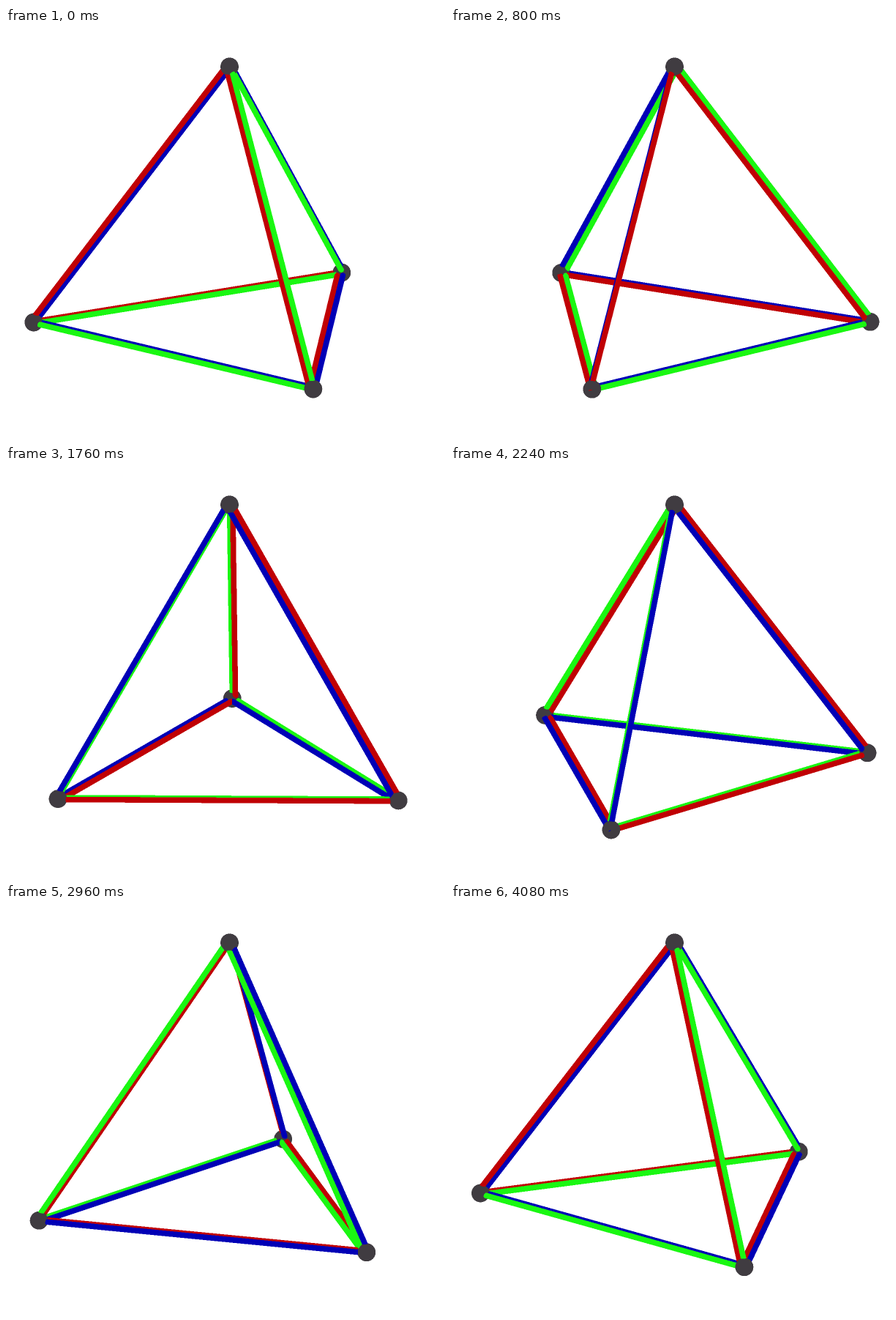
These frames come from a looping animation (600x560 px, 4.16 s). An HTML page with a canvas:

```html
<!DOCTYPE html>
<html lang="en">
<head>
<meta charset="utf-8">
<title>Rotating tetrahedron</title>
<style>
  html, body { margin: 0; width: 100%; height: 100%; overflow: hidden; background: #fff; }
  canvas { display: block; }
</style>
</head>
<body>
<canvas id="stage" width="600" height="560"></canvas>
<script>
const WIDTH = 600, HEIGHT = 560, SCALE = 2;   // rendered at double size, then smoothed down
const STEP_MS = 80, STEPS = 52;
const RADIUS = 268.6, TILT = Math.asin(0.343);
const CENTER = { x: 305.5, y: 409.7 };
const SOLID_HEIGHT = RADIUS * Math.SQRT2;
const BALL_RADIUS = 12.4, TUBE_RADIUS = 3.8;
const LOOP_SHIFT = 0.0188;                    // each loop slides level towards one base corner

const rgb = (r, g, b) => (255 << 24 | b << 16 | g << 8 | r) >>> 0;
const GREY = rgb(64, 60, 65);

// Corners: 0 is the apex, 1 to 3 are the base. Each loop visits all four.
const LOOPS = [
  { color: rgb(192, 0, 4), path: [0, 1, 3, 2], toward: 1 },
  { color: rgb(26, 247, 18), path: [0, 2, 1, 3], toward: 2 },
  { color: rgb(0, 0, 182), path: [0, 1, 2, 3], toward: 3 }
];

const stage = document.getElementById('stage').getContext('2d');
const buffer = document.createElement('canvas');
buffer.width = WIDTH * SCALE;
buffer.height = HEIGHT * SCALE;
const bufferContext = buffer.getContext('2d');
const image = bufferContext.createImageData(buffer.width, buffer.height);
const pixels = new Uint32Array(image.data.buffer);
const depths = new Float32Array(pixels.length);

// Orthographic view from slightly above; z grows towards the viewer.
function project(radius, angle, height) {
  const across = radius * Math.cos(angle), near = radius * Math.sin(angle);
  const sin = Math.sin(TILT), cos = Math.cos(TILT);
  return {
    x: (CENTER.x + across) * SCALE,
    y: (CENTER.y + near * sin - height * cos) * SCALE,
    z: (near * cos + height * sin) * SCALE
  };
}

function plot(x, y, z, color) {
  const i = y * buffer.width + x;
  if (z > depths[i]) {
    depths[i] = z;
    pixels[i] = color;
  }
}

function drawBall(c, radius, color) {
  const r = radius * SCALE;
  for (let y = Math.ceil(c.y - r - 0.5); y + 0.5 <= c.y + r; y++) {
    for (let x = Math.ceil(c.x - r - 0.5); x + 0.5 <= c.x + r; x++) {
      const rest = r * r - (x + 0.5 - c.x) ** 2 - (y + 0.5 - c.y) ** 2;
      if (rest > 0) plot(x, y, c.z + Math.sqrt(rest), color);
    }
  }
}

function drawTube(a, b, color) {
  const r = TUBE_RADIUS * SCALE;
  const dx = b.x - a.x, dy = (b.y - a.y) || 1e-6, dz = b.z - a.z;
  const flat = Math.hypot(dx, dy), stretch = Math.hypot(flat, dz) / flat;
  const half = r * flat / Math.abs(dy);
  const left = Math.min(a.x, b.x) - r, right = Math.max(a.x, b.x) + r;
  const bottom = Math.max(a.y, b.y) + r;
  for (let y = Math.ceil(Math.min(a.y, b.y) - r); y < bottom; y++) {
    const py = y + 0.5 - a.y;
    const middle = a.x + py * dx / dy;
    const end = Math.min(right, middle + half);
    for (let x = Math.ceil(Math.max(left, middle - half) - 0.5); x + 0.5 <= end; x++) {
      const px = x + 0.5 - a.x;
      const along = (px * dx + py * dy) / (flat * flat);
      const side = (px * dy - py * dx) / flat;
      const rest = r * r - side * side;
      if (along >= 0 && along <= 1 && rest > 0) {
        plot(x, y, a.z + along * dz + Math.sqrt(rest) * stretch, color);
      }
    }
  }
  drawBall(a, TUBE_RADIUS, color);
}

// Seven degrees per step, with every fourth step slightly late.
const turnAt = step => 7 * step - (step % 4 === 3 ? 1.4 : 0);

function render(step) {
  const base = n => project(RADIUS, (184.8 - 120 * n - turnAt(step)) * Math.PI / 180, 0);
  const corners = [project(0, 0, SOLID_HEIGHT), base(0), base(1), base(2)];
  const floor = project(0, 0, 0);

  pixels.fill(0xffffffff);
  depths.fill(-1e9);
  corners.forEach(c => drawBall(c, BALL_RADIUS, GREY));
  for (const { color, path, toward } of LOOPS) {
    const shift = axis => (corners[toward][axis] - floor[axis]) * LOOP_SHIFT;
    const points = path.map(n => ({
      x: corners[n].x + shift('x'),
      y: corners[n].y + shift('y'),
      z: corners[n].z + shift('z')
    }));
    points.forEach((p, i) => drawTube(p, points[(i + 1) % 4], color));
  }
  bufferContext.putImageData(image, 0, 0);
  stage.drawImage(buffer, 0, 0, WIDTH, HEIGHT);
}

const start = performance.now();
let shown = -1;
function tick() {
  const step = Math.floor((performance.now() - start) / STEP_MS) % STEPS;
  if (step !== shown) render(shown = step);
  requestAnimationFrame(tick);
}
tick();
</script>
</body>
</html>
```
